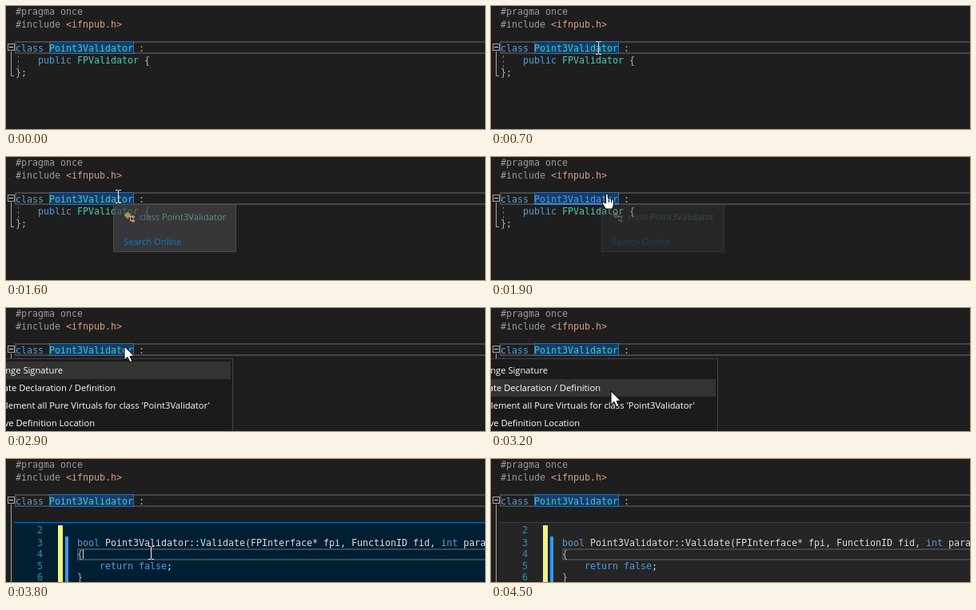
Animation, 599 px wide and 154 px high, one loop 4600 ms. Source, as an HTML page with a canvas:

```html
<!DOCTYPE html>
<html lang="en">
<head>
<meta charset="utf-8">
<style>
  html, body { margin: 0; width: 100%; height: 100%; overflow: hidden; background: #1e1e1e; }
  canvas { display: block; }
</style>
</head>
<body>
<canvas id="stage" width="599" height="154"></canvas>
<script>
const g = document.getElementById('stage').getContext('2d');
const LOOP = 4600, STEP = 100, CHAR = 7;
const MONO = '11.63px "DejaVu Sans Mono", monospace';
const UI = '11.2px "Open Sans", sans-serif';
const BG = '#1e1e1e', KEY = '#569cd6', TYPE = '#4ec9b0', TEXT = '#dcdcdc', PUNCT = '#b4b4b4',
      GREY = '#9b9b9b', STRING = '#d69d85', COMMENT = '#57a64a', LINE = '#464646';

const clamp = v => Math.max(0, Math.min(1, v));
const baseline = row => Math.round(11.3 + 15.2 * row);

function rect(x, y, w, h, color) {
  g.fillStyle = color;
  g.fillRect(x, y, w, h);
}

function frame(x, y, w, h, color, weight = 1) {
  g.strokeStyle = color;
  g.lineWidth = weight;
  g.strokeRect(x + weight / 2, y + weight / 2, w - weight, h - weight);
}

function label(text, x, y, color, align = 'left') {
  g.font = UI;
  g.textAlign = align;
  g.fillStyle = color;
  g.fillText(text, x, y);
}

// Monospaced text from alternating colours and strings
function code(x, y, ...parts) {
  g.font = MONO;
  g.textAlign = 'left';
  for (let i = 0; i < parts.length; i += 2) {
    g.fillStyle = parts[i];
    for (const ch of parts[i + 1]) {
      g.fillText(ch, x, y);
      x += CHAR;
    }
  }
}

function polygon(points, fill, stroke) {
  g.beginPath();
  points.forEach(([x, y]) => g.lineTo(x, y));
  g.closePath();
  g.fillStyle = fill;
  g.fill();
  if (stroke) {
    g.strokeStyle = stroke;
    g.lineWidth = 1;
    g.stroke();
  }
}

function drawEditor(t) {
  const inserted = t >= 3500, peek = t >= 3700, link = t >= 1700 && t < 2300;
  rect(0, 0, 599, 154, BG);
  code(12, baseline(0), GREY, '#pragma once');
  code(12, baseline(1), GREY, '#include ', STRING, '<ifnpub.h>');

  frame(11, 44, 600, 16, LINE, 2);
  rect(54, 44, 106, 16, '#113d6f');
  frame(54, 44, 106, 16, '#3d6c9c');
  code(12, baseline(3), KEY, 'class ', link ? KEY : TYPE, 'Point3Validator', PUNCT, ' :');
  if (link) rect(54, 58, 105, 1, KEY);
  if (inserted && !peek) rect(131, 45, 1, 14, TEXT);

  const foot = peek ? 154 : inserted ? 118 : 87;
  rect(6, 57, 1, foot - 57, '#a5a5a5');
  rect(6, foot, 4, 1, '#a5a5a5');
  frame(2, 47, 9, 9, '#a5a5a5');
  rect(4, 51, 5, 1, TEXT);
  if (peek) return;

  for (let y = 62; y < (inserted ? 107 : 77); y += 6) rect(15, y, 1, 3, '#6a6a6a');
  code(40, baseline(4), KEY, 'public ', TYPE, 'FPValidator', PUNCT, ' {');
  if (inserted) {
    code(40, baseline(5), COMMENT, '// Inherited via FPValidator');
    code(40, baseline(6), KEY, 'virtual bool ', TEXT, 'Validate(FPInterface* fpi, FunctionID fid, ',
      KEY, 'int', TEXT, ' paramNum, FPValue& v');
  }
  code(12, baseline(inserted ? 7 : 5), PUNCT, '};');
}

function drawPeek(t) {
  const focused = t < 4500;
  rect(10, 79, 589, 75, focused ? '#001f33' : '#252526');
  rect(10, 79, 589, 1, focused ? '#007acc' : '#3f3f46');
  rect(65, 83, 6, 71, '#eff284');
  rect(74, 97, 4, 57, '#3399ff');
  frame(89, 112, 520, 15, LINE, 2);
  const rows = [93, 109, 123, 138, 152];
  rows.forEach((y, i) => code(39, y, '#2b91af', String(i + 2)));
  code(89, rows[1], KEY, 'bool ', TEXT, 'Point3Validator::Validate(FPInterface* fpi, FunctionID fid, ',
    KEY, 'int', TEXT, ' para');
  code(89, rows[2], PUNCT, '{');
  code(117, rows[3], KEY, 'return false', TEXT, ';');
  code(89, rows[4], PUNCT, '}');
  if (t < 4200) rect(96, 113, 1, 12, TEXT);
}

function drawTooltip(t) {
  const fade = clamp((t - 1400) / 500);
  g.save();
  g.globalAlpha = clamp((t - 700) / 500) * (1 - .75 * fade);
  g.translate(132 + Math.round(6 * fade), 59);
  rect(0, 0, 154, 60, '#424245');
  frame(0, 0, 154, 60, '#55555a');
  rect(20, 15, 4, 1, TEXT);
  rect(21, 15, 1, 6, TEXT);
  rect(21, 20, 3, 1, TEXT);
  const diamond = (x, y, r) =>
    polygon([[x, y - r], [x + r, y], [x, y + r], [x - r, y]], '#e8b06e');
  diamond(18, 14, 4.5);
  diamond(25, 16, 2.5);
  diamond(25, 21, 2.5);
  label('class', 33, 20, KEY);
  label('Point3Validator', 141, 20, TYPE, 'right');
  label('Search Online', 13, 51, '#0097fb');
  g.restore();
}

const menuItems = [
  ['Change Signature', 71],
  ['Create Declaration / Definition', 137],
  ["Implement all Pure Virtuals for class 'Point3Validator'", 255],
  ['Move Definition Location', 111]
];

function drawMenu(pointerY) {
  const active = Math.max(0, Math.floor((pointerY - 67) / 22));
  rect(0, 63, 284, 91, '#1b1b1c');
  frame(-1, 63, 285, 100, '#434346');
  menuItems.forEach(([text, right], i) => {
    if (i === active) rect(0, 67 + 22 * i, 281, 22, '#333334');
    label(text, right, 82 + 22 * i, '#fff', 'right');
  });
}

// Pointer path: time, x, y of the hot spot
const path = [
  [200, 403, 8], [400, 300, 60], [500, 220, 83], [700, 134, 52], [1400, 134, 52],
  [1800, 145, 46], [2200, 145, 46], [2300, 148, 48], [2900, 148, 48], [3300, 150, 122],
  [3400, 150, 122], [3500, 181, 117], [3900, 181, 117], [4000, 300, 39],
  [4100, 440, 31], [4200, 588, 33]
];

function pointerAt(t) {
  const i = path.findIndex(p => p[0] >= t);
  if (i < 1) return path[0].slice(1);
  const [t0, x0, y0] = path[i - 1], [t1, x1, y1] = path[i];
  const k = (t - t0) / (t1 - t0);
  return [Math.round(x0 + (x1 - x0) * k), Math.round(y0 + (y1 - y0) * k)];
}

function drawPointer(t, x, y) {
  g.save();
  g.translate(x, y);
  if (t >= 2300 && t < 3500) {
    polygon([[0, 0], [0, 17], [4, 13.5], [7, 20], [10, 18.5], [7, 12.5], [12, 12]], '#fff', '#000');
  } else if (t >= 1700 && t < 2300) {
    polygon([[-1.5, 0], [1, 0], [1.5, 6], [4, 6], [6.5, 7], [8.5, 9], [8.5, 14],
      [6.5, 19], [-1.5, 19], [-6, 12], [-5, 10], [-1.5, 12]], '#fff', '#000');
    for (const dx of [2, 5]) rect(dx, 7, 1, 4, '#000');
  } else {
    rect(0, -7, 1, 15, '#e8e8e8');
    for (const dy of [-8, 8]) {
      rect(-3, dy, 3, 1, '#e8e8e8');
      rect(1, dy, 3, 1, '#e8e8e8');
    }
  }
  g.restore();
}

const start = performance.now();

function draw() {
  const elapsed = performance.now() - start;
  const t = Math.floor(elapsed % LOOP / STEP) * STEP;
  const [x, y] = pointerAt(t);
  drawEditor(t);
  if (t >= 800 && t < 2300) drawTooltip(t);
  if (t >= 2300 && t < 3500) drawMenu(y);
  if (t >= 3700) drawPeek(t);
  if (t >= 200 && t < 4300) drawPointer(t, x, y);
  requestAnimationFrame(draw);
}

draw();
</script>
</body>
</html>
```
